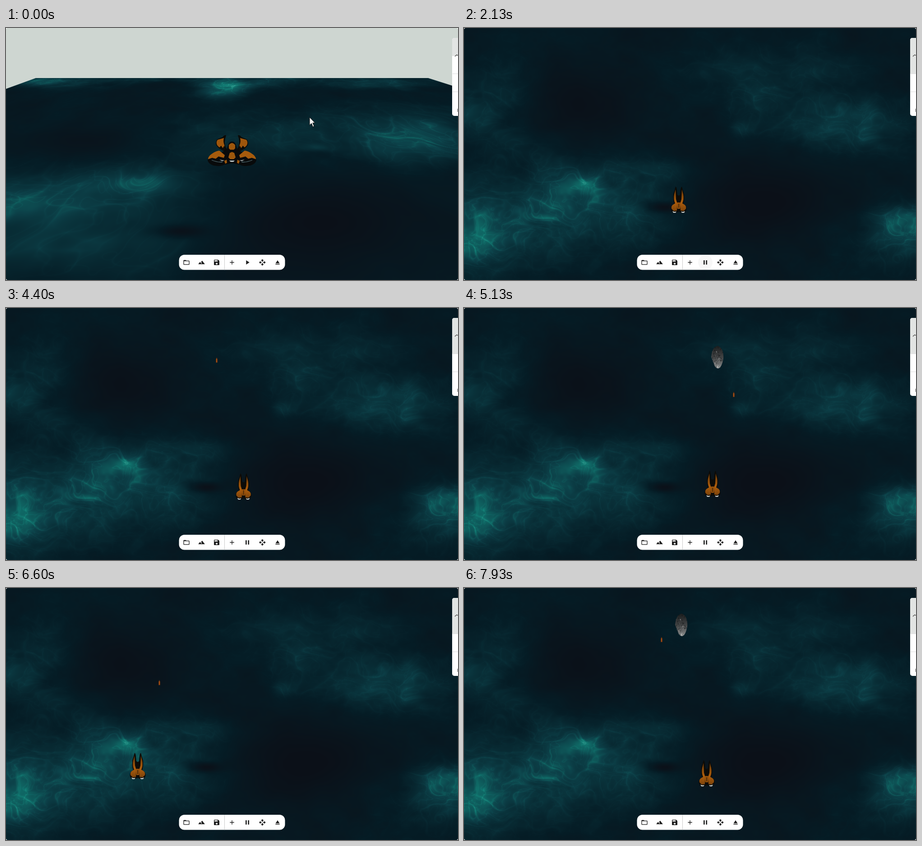
Recreate the animation shown at these times as an HTML page with a canvas. Size 1002x559 px, loop 8 s.

```html
<!DOCTYPE html>
<html lang="en">
<head>
<meta charset="utf-8">
<title>Space scene editor</title>
<style>
html, body { margin: 0; width: 100%; height: 100%; overflow: hidden; background: #fff; }
#stage { position: relative; width: 1002px; height: 559px; overflow: hidden; border-radius: 4px; }
canvas, svg { position: absolute; left: 0; top: 0; display: block; }
</style>
</head>
<body>
<div id="stage">
<canvas id="editView" width="1002" height="559"></canvas>
<canvas id="playView" width="1002" height="559"></canvas>
<svg width="1002" height="559" viewBox="0 0 1002 559">
  <defs>
    <linearGradient id="hull" x1="0" y1="0" x2="0" y2="1">
      <stop offset="0" stop-color="#6b3a09"/><stop offset=".6" stop-color="#ac5d0d"/><stop offset="1" stop-color="#7c430b"/>
    </linearGradient>
    <linearGradient id="stone" x1="0" y1="0" x2="0" y2="1">
      <stop offset="0" stop-color="#191b1c"/><stop offset=".5" stop-color="#414344"/><stop offset="1" stop-color="#8e9090"/>
    </linearGradient>
    <clipPath id="rockClip"><path d="M0-25Q8-22 11-14Q15-2 12 8Q9 22 3 25Q-4 26-7 18Q-11 8-14 0Q-13-14-7-21Z"/></clipPath>

    <g id="rearHalf">
      <path d="M0-20Q6-20 8-14L12-2 27 6Q53 14 54 21Q53 29 41 33Q25 36 17 31L0 28Z" fill="#080a0b"/>
      <path d="M13-34Q17-35 21-30L33-25Q37-19 35-12L29-5 16 2 11-3Q20-15 13-34Z" fill="#0b0905"/>
      <path d="M18-28L32-24Q36-19 33-12L28-7 24-11 21-6 16-3 17-13Q20-20 18-28Z" fill="#9e560c"/>
      <path d="M28 0Q36 1 43 6Q53 12 53 19L44 16 36 18 30 13 18 16 16 10Z" fill="#a65b0d"/>
      <path d="M0-17Q5-16 7-12L7-5 4-2H0ZM0 3L5 5 8 15 4 19H0ZM12 20L17 23 15 29 11 27Z" fill="#9d570c"/>
      <path d="M21 25Q30 27 45 21" fill="none" stroke="#4d6870" stroke-width="1.3"/>
      <path d="M16 22L28 20 22 23ZM0 22H6L3 25H0Z" fill="#b9c1c1"/>
      <path d="M14-7L18-10 20-6 25-8 22-1 16 1Z" fill="#0d0c09"/>
    </g>
    <g id="topHalf">
      <path d="M0-10L3-12 4-23Q5-30 7-30L9-23 12-13Q13-1 10 8Q18 12 17.5 20Q16 28 7 28L0 25Z" fill="#0c0b08"/>
      <path d="M7-24L10-13Q12-2 8 7L13 10Q17 13 16 19L11 24 4 23 3 8 6-2Z" fill="url(#hull)"/>
      <path d="M0 5L4 5 3 19H0Z" fill="#95500b"/>
      <path d="M0 8V17" stroke="#27180b" stroke-width="1"/>
      <path d="M5 25Q10 27 14 24L12 28 7 28Z" fill="#c7cbc8"/>
    </g>
  </defs>

  <g id="rearShip" transform="translate(501 272)">
    <use href="#rearHalf"/><use href="#rearHalf" transform="scale(-1 1)"/>
  </g>

  <g id="game">
    <g id="rock">
      <g clip-path="url(#rockClip)">
        <rect x="-15" y="-26" width="30" height="52" fill="url(#stone)"/>
        <g id="grain"></g>
      </g>
    </g>
    <g id="bullets"></g>
    <g id="ship"><use href="#topHalf"/><use href="#topHalf" transform="scale(-1 1)"/></g>
  </g>

  <g id="panel">
    <rect x="989" y="22" width="20" height="173" rx="5" fill="#fff"/>
    <path id="panelHead" fill="#e2e4e3"/>
    <path d="M990 101.5H1002M990 141.5H1002" stroke="#dedede"/>
    <path d="M995 63L999 59.5 1002 61" fill="none" stroke="#444" stroke-width="1.2"/>
    <path d="M1001.5 179V186" stroke="#444"/>
  </g>

  <rect x="383.5" y="503" width="235" height="33.5" rx="12" fill="#fff"/>
  <path d="M484.5 503V536.5" stroke="#c9c9c9"/>
  <circle id="hover" cx="535" cy="520" r="16" fill="#f7f7f7"/>
  <g id="icons" fill="#1f1f1f"></g>

  <path id="arrow" d="M0 0V17.5L4.2 13.6 7.2 21.2 10 20 6.9 12.6H12Z" fill="#f4f4f4" stroke="#111" stroke-width="1"/>
  <path id="hand" d="M3 1.5Q5-.5 6 2V8Q8 7 9 9Q11 8 12 10Q14 10 13.5 13L12.5 18 11 21H4L0 14Q-2 11 0 11L3 13Z" fill="#080808" stroke="#fff" stroke-width="1.5" paint-order="stroke"/>
</svg>
</div>
<script>
const W = 1002, H = 559, LOOP = 8000, PLAY_AT = 1530;
const $ = id => document.getElementById(id);

function seeded(seed) {
  return () => (seed = (seed * 1664525 + 1013904223) >>> 0) / 4294967296;
}

function add(parent, tag, attrs) {
  const el = document.createElementNS('http://www.w3.org/2000/svg', tag);
  for (const key in attrs) el.setAttribute(key, attrs[key]);
  return parent.appendChild(el);
}

// --- nebula -------------------------------------------------------------
const lattice = Float32Array.from({ length: 65536 }, seeded(77));

function noise(x, y) {
  const xi = Math.floor(x), yi = Math.floor(y);
  let fx = x - xi, fy = y - yi;
  fx *= fx * (3 - 2 * fx);
  fy *= fy * (3 - 2 * fy);
  const x0 = xi & 255, x1 = (xi + 1) & 255, y0 = (yi & 255) << 8, y1 = ((yi + 1) & 255) << 8;
  const a = lattice[x0 | y0], b = lattice[x0 | y1];
  const top = a + (lattice[x1 | y0] - a) * fx;
  return top + (b + (lattice[x1 | y1] - b) * fx - top) * fy;
}

function fbm(x, y) {
  return noise(x, y) * .5 + noise(x * 2.1 + 7, y * 2.1) * .28 + noise(x * 4.3, y * 4.3 + 9) * .15 + noise(x * 9, y * 9) * .07;
}

function filament(x, y) {
  let r = 1 - Math.abs(2 * noise(x, y) - 1);
  r *= r;
  r *= r;
  return r * r * r;
}

const ramp = [[0, 11, 16, 24], [.12, 5, 28, 37], [.35, 12, 64, 72], [.6, 17, 122, 114], [1, 110, 215, 195]];

function shade(i, data, p) {
  let k = 1;
  while (k < 4 && i > ramp[k][0]) k++;
  const a = ramp[k - 1], b = ramp[k], f = Math.min(1, (i - a[0]) / (b[0] - a[0]));
  for (let c = 1; c < 4; c++) data[p++] = a[c] + (b[c] - a[c]) * f;
  data[p] = 255;
}

// Each glow is x, y, radius x, radius y, strength.
function paintNebula(canvas, glows, project, firstRow) {
  const ctx = canvas.getContext('2d'), img = ctx.createImageData(W, H);
  for (let y = firstRow; y < H; y++) {
    for (let x = 0; x < W; x++) {
      let e = .1;
      for (const [gx, gy, rx, ry, s] of glows) {
        const dx = (x - gx) / rx, dy = (y - gy) / ry, d = dx * dx + dy * dy;
        if (d < 6) e += s * Math.exp(-d);
      }
      e = Math.max(0, e);
      const [u, v] = project(x, y);
      const cloud = fbm(u / 85, v / 60);
      const wu = u + v * .35 + 70 * cloud, wv = v - u * .2 + 55 * noise(u / 40 + 30, v / 32);
      const wisps = filament(wu / 62, wv / 36) * .5 + filament(wu / 27 + 40, wv / 15) * .35 + filament(wu / 11, wv / 7 + 60) * .25;
      shade(e * (.4 + cloud * .95) + Math.max(0, e - .08) * wisps * cloud * 1.3, img.data, (y * W + x) * 4);
    }
  }
  ctx.putImageData(img, 0, 0);
  return ctx;
}

const floorGlows = [
  [500, 112, 450, 8, .15], [480, 137, 48, 16, .55], [525, 124, 65, 9, .35], [120, 120, 110, 11, .25],
  [820, 123, 120, 10, .18], [700, 235, 330, 60, .13], [930, 250, 130, 48, .2], [690, 265, 45, 8, .14],
  [20, 375, 110, 45, .22], [190, 400, 230, 100, .2], [300, 346, 140, 22, .16], [80, 490, 220, 80, .12],
  [690, 430, 220, 100, -.1], [190, 255, 150, 40, -.08], [380, 450, 55, 14, -.15]
];
const spaceGlows = [
  [5, 465, 75, 48, .42], [130, 430, 210, 100, .2], [300, 385, 190, 80, .16], [258, 347, 34, 20, .32],
  [180, 421, 24, 8, .2], [375, 318, 120, 28, .13], [40, 180, 120, 90, .13], [990, 432, 75, 46, .34],
  [850, 208, 140, 62, .2], [700, 130, 180, 85, .1], [920, 480, 160, 80, .08], [615, 222, 26, 14, .1],
  [650, 390, 210, 95, -.11], [250, 170, 110, 75, -.09], [440, 397, 34, 12, -.16]
];

const floor = paintNebula($('editView'), floorGlows, (x, y) => {
  const depth = 185 / (y + 47);
  return [(x - 501) * depth + 900, 1400 - depth * 450];
}, 110);
floor.fillStyle = '#ced6d1';
floor.beginPath();
[[0, 0], [W, 0], [W, 132], [936, 111], [66, 111], [0, 135]].forEach(p => floor.lineTo(...p));
floor.fill();
paintNebula($('playView'), spaceGlows, (x, y) => [x + 400, y + 700], 0);

// --- static parts -------------------------------------------------------
const iconPaths = [
  [400, 'M20 6h-8l-2-2H4c-1.1 0-1.99.9-1.99 2L2 18c0 1.1.9 2 2 2h16c1.1 0 2-.9 2-2V8c0-1.1-.9-2-2-2zm0 12H4V8h16v10z'],
  [433.5, 'M14 6l-3.75 5 2.85 3.8-1.6 1.2C9.81 13.75 7 10 7 10l-6 8h22L14 6z'],
  [467, 'M17 3H5c-1.11 0-2 .9-2 2v14c0 1.1.89 2 2 2h14c1.1 0 2-.9 2-2V7l-4-4zm-5 16c-1.66 0-3-1.34-3-3s1.34-3 3-3 3 1.34 3 3-1.34 3-3 3zm3-10H5V5h10v4z'],
  [501, 'M19 13h-6v6h-2v-6H5v-2h6V5h2v6h6v2z'],
  [535, ''],
  [568.3, 'M10 9h4V6h3l-5-5-5 5h3v3zm-1 1H6V7l-5 5 5 5v-3h3v-4zm14 2l-5-5v3h-3v4h3v3l5-5zm-9 3h-4v3H7l5 5 5-5h-3v-3z'],
  [602, 'M5 17h14v2H5zm7-12L5.33 15h13.34z']
];
const PLAY = 'M8 5v14l11-7z', PAUSE = 'M6 19h4V5H6v14zm8-14v14h4V5h-4z';
const icons = iconPaths.map(([x, d]) => add($('icons'), 'path', { d, transform: `translate(${x - 8} 512) scale(.667)` }));

const rand = seeded(5);
for (let i = 0; i < 110; i++) {
  const x = rand() * 28 - 14, y = rand() * 52 - 26, lit = rand() < .3 + y / 120;
  add($('grain'), 'path', {
    d: `M${x} ${y}l${rand() * 5 - 2} ${rand() * 4 - 1}l${rand() * 3 - 2} ${rand() * 4}z`,
    fill: lit ? '#d5d7d6' : '#0b0d0e', opacity: .55 + rand() * .4
  });
}

// --- motion: time, x, y -------------------------------------------------
const cursorPath = [
  [70, 673, 198], [270, 583, 301], [470, 583, 301], [700, 545, 400], [930, 500, 512], [1200, 525, 522]
];
const shipPath = [
  [1530, 500, 383], [2130, 476, 382], [2530, 476, 382], [3330, 379, 393], [3400, 379, 394], [3530, 394, 395],
  [4200, 496, 398], [4867, 598, 395], [5130, 551, 391], [5420, 506, 394], [5930, 548, 397], [6367, 340, 402],
  [6600, 292, 396], [6870, 292, 404], [7538, 438, 405], [7670, 492, 405], [7730, 512, 408], [7860, 551, 417],
  [7930, 538, 412], [8000, 524, 408]
];
const rocks = [{ x: 562, born: 4690, dies: 5420 }, { x: 482, born: 7650, dies: LOOP }];
const shots = [2640, 3393, 4010, 4867, 5140, 6367, 6950, 7538].map(fired => ({
  fired,
  ends: fired === 5140 ? rocks[0].dies : fired + 590,
  x: along(shipPath, fired)[0],
  el: add($('bullets'), 'path', { d: 'M0-6L1.6-2V5H-1.6V-2Z', fill: '#a54f16', stroke: '#492611', 'stroke-width': .6 })
}));

function along(path, t) {
  if (t <= path[0][0]) return path[0].slice(1);
  for (let i = 1; i < path.length; i++) {
    const [t0, x0, y0] = path[i - 1], [t1, x1, y1] = path[i];
    if (t < t1) {
      const f = (t - t0) / (t1 - t0);
      return [x0 + (x1 - x0) * f, y0 + (y1 - y0) * f];
    }
  }
  return path[path.length - 1].slice(1);
}

const show = (el, on) => { el.style.display = on ? '' : 'none'; };
const place = (el, x, y) => el.setAttribute('transform', `translate(${x.toFixed(2)} ${y.toFixed(2)})`);

function draw(t) {
  const playing = t >= PLAY_AT;
  show($('editView'), !playing);
  show($('rearShip'), !playing);
  show($('playView'), playing);
  show($('game'), playing);
  show($('hover'), playing && t < 2530);
  icons[4].setAttribute('d', playing ? PAUSE : PLAY);
  $('panelHead').setAttribute('d', `M1002 22H994Q989 22 989 27V${playing ? 101 : 62}H1002Z`);

  const [cx, cy] = along(cursorPath, t), pointing = cy > 502;
  show($('arrow'), !playing && !pointing);
  show($('hand'), !playing && pointing);
  place($('arrow'), cx, cy);
  place($('hand'), cx, cy);

  place($('ship'), ...along(shipPath, t));
  const rock = rocks.find(r => t >= r.born && t < r.dies);
  show($('rock'), rock);
  if (rock) place($('rock'), rock.x, 34 + .17 * (t - rock.born));
  for (const s of shots) {
    show(s.el, t >= s.fired && t < s.ends);
    place(s.el, s.x, 350 - .6 * (t - s.fired));
  }
}

let start;
function tick(now) {
  if (start === undefined) start = now;
  draw((now - start) % LOOP);
  requestAnimationFrame(tick);
}
draw(0);
requestAnimationFrame(tick);
</script>
</body>
</html>
```
